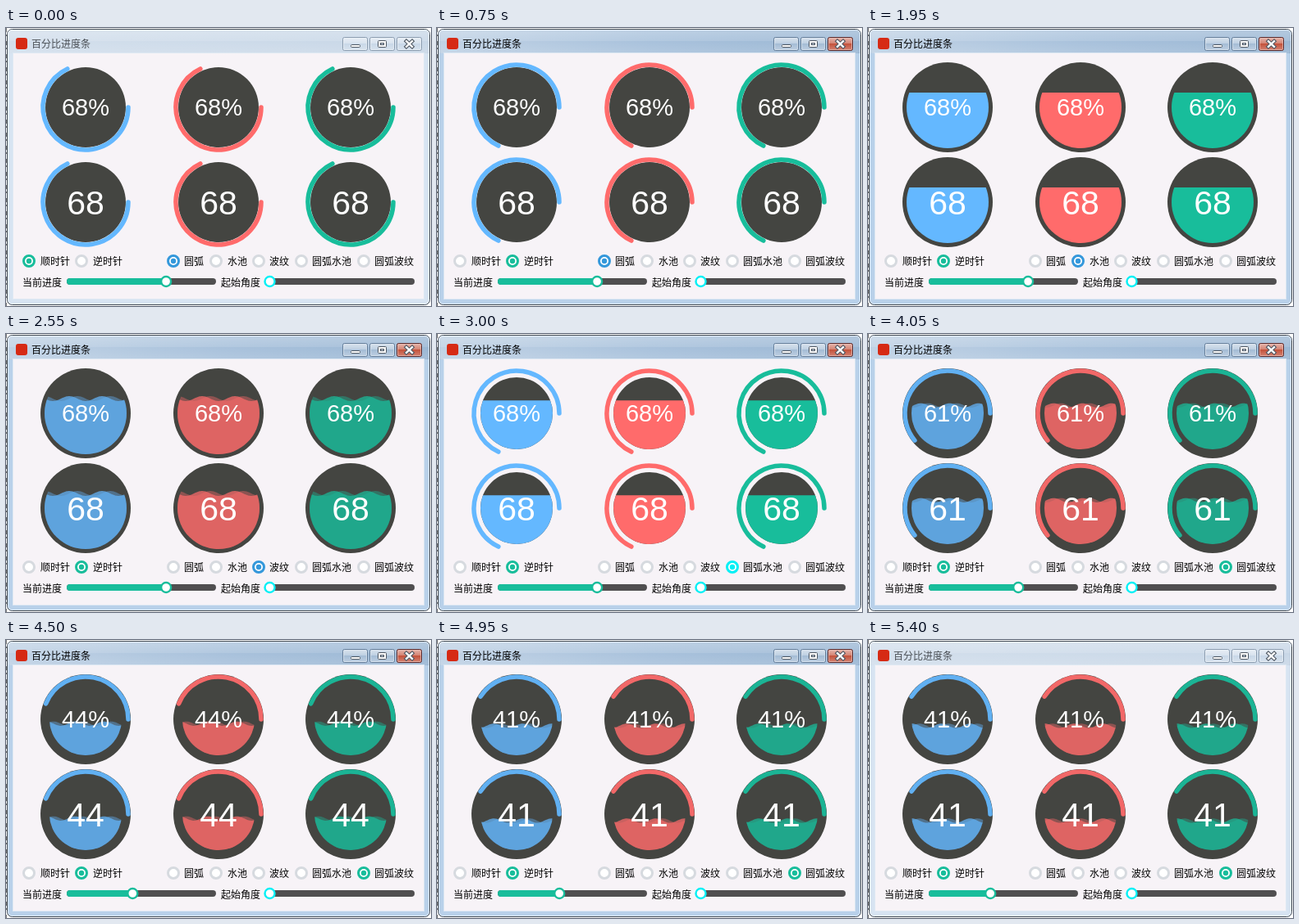
Recreate the animation shown at these times as an HTML page. Size 518 by 340 pixels, loop 5550 ms.

```html
<!DOCTYPE html>
<html lang="zh">
<head>
<meta charset="utf-8">
<title>百分比进度条</title>
<style>
html, body { margin: 0; width: 100%; height: 100%; overflow: hidden; background: #fff; }
svg { display: block; width: 518px; height: 340px; }
text { font: 12px "Noto Sans CJK SC", "Noto Sans CJK", sans-serif; fill: #000; }
.num { font-family: "Liberation Sans", Arial, sans-serif; fill: #fff; text-anchor: middle; }
</style>
</head>
<body>
<svg id="stage" viewBox="0 0 518 340" xmlns="http://www.w3.org/2000/svg">
  <defs>
    <linearGradient id="titleOn">
      <stop offset="0" stop-color="#c0d2e5"/><stop offset=".5" stop-color="#a9c2dc"/><stop offset="1" stop-color="#9bb7d4"/>
    </linearGradient>
    <linearGradient id="titleOff">
      <stop offset="0" stop-color="#d3dfec"/><stop offset="1" stop-color="#c8d7e7"/>
    </linearGradient>
    <linearGradient id="glass" x2="0" y2="1">
      <stop offset="0" stop-color="#fff" stop-opacity=".55"/><stop offset=".5" stop-color="#fff" stop-opacity=".25"/>
      <stop offset=".5" stop-color="#fff" stop-opacity="0"/><stop offset="1" stop-color="#fff" stop-opacity=".25"/>
    </linearGradient>
  </defs>
</svg>
<script>
const LOOP = 5550, TICK = 150;
const DARK = '#444541', TRACK = '#504f50', CLIENT = '#f7f3f7';
const BLUE = '#64b8ff', RED = '#ff6b6b', TEAL = '#18bd9b', CYAN = '#00f0f5', PICK = '#3498db';
const stage = document.getElementById('stage');

// [start ms, value]
const styles = [[0, 'arc'], [1950, 'pool'], [2400, 'wave'], [3000, 'arcPool'], [3600, 'arcWave']];
const values = [[0, 68], [3900, 66], [4050, 61], [4200, 55], [4350, 49], [4500, 44], [4650, 42], [4800, 41]];
const at = (steps, t) => steps.filter(s => s[0] <= t).pop()[1];

function add(tag, attrs, parent = stage) {
  const el = document.createElementNS('http://www.w3.org/2000/svg', tag);
  set(el, attrs);
  parent.appendChild(el);
  return el;
}
function set(el, attrs) {
  for (const k in attrs) el.setAttribute(k, attrs[k]);
}
function label(x, y, str, attrs = {}) {
  const el = add('text', { x, y, ...attrs });
  el.textContent = str;
  return el;
}

// Window chrome
add('path', { d: 'M.5 0V340', stroke: '#777', 'stroke-dasharray': '5 3 2 6' });
const frame = add('rect', { x: 1.5, y: 1.5, width: 515, height: 337, rx: 6, stroke: '#3c4650' });
const bar = add('path', { d: 'M2 31V8Q2 2 8 2H510Q516 2 516 8V31Z' });
add('rect', { x: 2, y: 2, width: 514, height: 29, rx: 5, fill: 'url(#glass)', opacity: .45 });
add('rect', { x: 2.5, y: 2.5, width: 513, height: 335, rx: 5, fill: 'none', stroke: '#fff', 'stroke-opacity': .55 });
add('rect', { x: 8.5, y: 30.5, width: 501, height: 301, fill: CLIENT, stroke: '#dfe9f3' });
add('rect', { x: 12, y: 12, width: 14, height: 14, rx: 3, fill: '#d62a14' });
const title = label(31, 24, '百分比进度条');

const buttons = [410, 443, 476].map(x => {
  const face = add('rect', { x: x + .5, y: 11.5, width: 30, height: 16, rx: 2 });
  add('rect', { x: x + 1.5, y: 12.5, width: 28, height: 14, rx: 1, fill: 'url(#glass)', stroke: '#fff', 'stroke-opacity': .45 });
  return face;
});
add('rect', { x: 420.5, y: 20.5, width: 11, height: 3, rx: 1, fill: '#fff', stroke: '#4d5661' });
add('rect', { x: 453.5, y: 15.5, width: 10, height: 8, rx: 1, fill: '#fff', stroke: '#4d5661' });
add('rect', { x: 456.5, y: 18.5, width: 4, height: 2, fill: '#c9d7e6', stroke: '#4d5661' });
for (const [stroke, w] of [['#4d5661', 4.6], ['#fff', 2.4]])
  add('path', { d: 'M488 16.2L495 22.8M495 16.2L488 22.8', stroke, 'stroke-width': w, 'stroke-linecap': 'square' });

// Gauges
let clipId = 0;
function gauge(cx, cy, color, size, unit) {
  const g = add('g', { transform: `translate(${cx} ${cy})` });
  const id = 'clip' + clipId++;
  const clip = add('circle', {}, add('clipPath', { id }, g));
  const disc = add('circle', { fill: DARK }, g);
  const arc = add('path', { fill: 'none', stroke: color, 'stroke-width': 5.5, 'stroke-linecap': 'round' }, g);
  const water = add('g', { 'clip-path': `url(#${id})`, fill: color }, g);
  const back = add('path', {}, water), front = add('path', {}, water);
  const num = add('text', { class: 'num', y: size * .355, style: `font-size:${size}px` }, g);

  return ({ style, value, clockwise, phase }) => {
    const hasArc = style.startsWith('arc');
    const wavy = /wave/i.test(style);
    const r = style === 'arc' ? 49 : hasArc ? 44 : 50;
    disc.setAttribute('r', style.startsWith('arcP') ? 44 : style === 'arc' ? 49 : 55);
    clip.setAttribute('r', r);
    const a = value / 100 * 2 * Math.PI * (clockwise ? 1 : -1);
    set(arc, {
      d: `M52 0A52 52 0 ${value > 50 ? 1 : 0} ${clockwise ? 1 : 0} ${52 * Math.cos(a)} ${52 * Math.sin(a)}`,
      visibility: hasArc ? 'visible' : 'hidden',
      opacity: style === 'arcWave' ? .93 : 1
    });
    water.setAttribute('visibility', style === 'arc' ? 'hidden' : 'visible');
    const level = r - value / 100 * 2 * r;
    const surface = shift => {
      let d = `M${-r} ${r}`;
      for (let x = 0; x <= 2 * r; x++) {
        const y = level + (wavy ? .03 * 2 * r * Math.sin(5 * Math.PI / (2 * r) * x + shift) : 0);
        d += `L${x - r} ${y.toFixed(2)}`;
      }
      return d + `V${r}Z`;
    };
    set(back, { d: surface(phase - Math.PI / 2), 'fill-opacity': wavy ? .39 : 0 });
    set(front, { d: surface(phase), 'fill-opacity': wavy ? .71 : 1 });
    num.textContent = value + unit;
  };
}
const gauges = [];
for (const [cy, size, unit] of [[97, 29, '%'], [213, 41, '']])
  [[97, BLUE], [259, RED], [420, TEAL]].forEach(([cx, c]) => gauges.push(gauge(cx, cy, c, size, unit)));

// Radio buttons
function radio(cx, str, color, tx) {
  const ring = add('circle', { cx, cy: 285, r: 6.5, fill: '#fff', 'stroke-width': 3 });
  const dot = add('circle', { cx, cy: 285, r: 3.2, fill: color });
  label(tx, 289.5, str);
  return on => {
    ring.setAttribute('stroke', on ? color : '#d6dadf');
    dot.setAttribute('visibility', on ? 'visible' : 'hidden');
  };
}
const forward = radio(28, '顺时针', TEAL, 42);
const reverse = radio(92, '逆时针', TEAL, 106);
const modes = {
  arc: radio(204, '圆弧', PICK, 217),
  pool: radio(256, '水池', PICK, 270),
  wave: radio(308, '波纹', PICK, 321),
  arcPool: radio(360, '圆弧水池', CYAN, 373),
  arcWave: radio(436, '圆弧波纹', TEAL, 449)
};

// Sliders
function slider(x, str, tx, color) {
  label(tx, 315.5, str);
  const groove = { x, y: 306, width: 182, height: 8, rx: 4 };
  add('rect', { ...groove, fill: TRACK });
  const fill = add('rect', { ...groove, fill: color });
  const knob = add('circle', { cy: 310, r: 6, fill: '#fff', stroke: color, 'stroke-width': 2.4 });
  return v => {
    const pos = 5.5 + 1.7 * v;
    fill.setAttribute('width', pos);
    knob.setAttribute('cx', x + pos);
  };
}
const progress = slider(74, '当前进度', 20, TEAL);
slider(316, '起始角度', 262, CYAN)(0);

function draw(t) {
  const active = t >= 750 && t < 5400;
  const clockwise = t < 750;
  const style = at(styles, t), value = at(values, t);
  frame.setAttribute('fill', active ? '#b9d1ea' : '#d7e4f2');
  bar.setAttribute('fill', active ? 'url(#titleOn)' : 'url(#titleOff)');
  title.style.fill = active ? '#000' : '#4a4f55';
  buttons.forEach((b, i) => set(b, {
    fill: !active ? '#c9d8e8' : i === 2 ? '#c4533c' : '#a5bdd6',
    stroke: !active ? '#8c9db0' : i === 2 ? '#5b2a2c' : '#667f9b'
  }));
  forward(clockwise);
  reverse(!clockwise);
  for (const m in modes) modes[m](m === style);
  progress(value);
  const phase = (t - 3600) * .006;
  gauges.forEach(g => g({ style, value, clockwise, phase }));
}

let last = -1;
const start = performance.now();
function run(now) {
  const t = Math.floor(Math.max(0, now - start) % LOOP / TICK) * TICK;
  if (t !== last) draw(last = t);
  requestAnimationFrame(run);
}
run(start);
</script>
</body>
</html>
```
